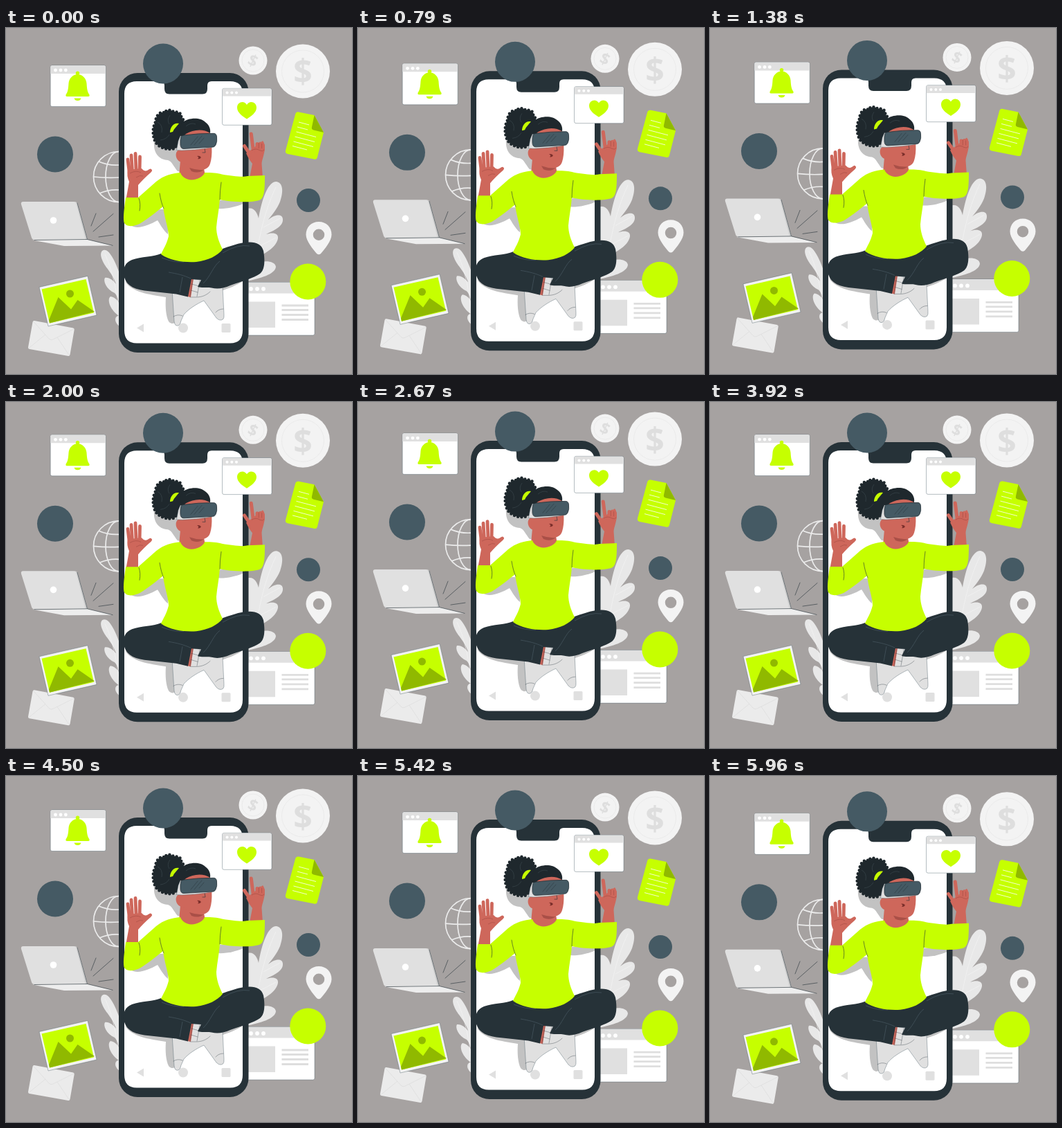
An HTML page that plays this animation: 500x500 px, repeating every 6 s.

```html
<!DOCTYPE html>
<html lang="en">
<head>
<meta charset="utf-8">
<title>Virtual reality on a phone</title>
<style>
html, body { margin: 0; width: 100%; height: 100%; overflow: hidden; background: #a6a2a1; }
svg { display: block; width: 100vw; height: 100vh; }
text { font: 700 48px "Open Sans", Lato, sans-serif; text-anchor: middle; fill: #dedede; }
.lime { fill: #c6ff00; }
.olive { fill: #90b900; }
.ink { fill: #263238; }
.slate { fill: #455a64; }
.skin { fill: #ce675b; }
.pale { fill: #f3f3f3; }
.gray { fill: #e0e0e0; }
.white { fill: #fff; }
.hand { fill: none; stroke: #ce675b; stroke-linecap: round; stroke-linejoin: round; }
.thin { fill: none; stroke: #263238; stroke-width: .6; stroke-linecap: round; stroke-linejoin: round; }
.edge { stroke: #455a64; stroke-width: .4; stroke-linejoin: round; }
</style>
</head>
<body>
<svg viewBox="0 0 500 500">
<defs>
  <clipPath id="screen"><rect x="171" y="77" width="171" height="378" rx="18"/></clipPath>
</defs>
<g id="scene">

  <!-- plants -->
  <g fill="#e8e8e8">
    <path d="M347 262C357 257 363 266 365 275C368 257 376 223 390 222C401 223 401 237 396 251C392 261 384 271 379 277C387 270 399 267 400 276C401 287 386 293 376 298C385 295 394 296 393 304C391 316 377 324 365 331L361 341C371 335 389 336 390 345C389 356 367 362 347 366Z"/>
    <path d="M139 322C146 317 155 328 166 360V432C156 427 156 416 163 416C149 406 146 391 151 388C157 389 161 393 163 397C162 390 160 386 157 383C145 378 140 365 143 361C149 360 155 365 159 370C156 360 151 354 146 347C140 339 134 327 139 322Z"/>
  </g>
  <path d="M390 230C376 260 366 292 357 362M396 275L372 288M390 303L365 316M143 327C153 348 160 377 165 420" fill="none" stroke="#f5f5f5" stroke-width=".6"/>

  <!-- globe -->
  <g fill="none" stroke="#ebebeb" stroke-width="1.700">
    <circle cx="163" cy="215" r="36.500"/>
    <ellipse cx="163" cy="215" rx="19" ry="36.500"/>
    <path d="M126.500 215Q145 217 163 216M134 193Q148 199 163 198M135 239Q149 233 163 234"/>
  </g>

  <!-- bell window -->
  <rect class="white edge" x="64.200" y="54" width="80" height="59.500" rx="2.500"/>
  <path class="gray" d="M64.300 66V56Q64.300 54.200 66.500 54.200H141.500Q143.900 54.200 143.900 56V66Z"/>
  <g class="white"><circle cx="71.500" cy="61" r="2.400"/><circle cx="79" cy="61" r="2.400"/><circle cx="86.300" cy="61" r="2.400"/></g>
  <g class="lime">
    <circle cx="103.500" cy="65.300" r="2.700"/>
    <path d="M103.500 67C110.500 67 116 73 116.500 80C117 88 117.500 92 120.500 96.500Q121 99 119 99H88Q86 99 86.500 96.500C89.500 92 90 88 90.500 80C91 73 96.500 67 103.500 67ZM98.500 101.500H108.500Q107.500 105 103.500 105T98.500 101.500Z"/>
  </g>

  <!-- coins -->
  <g class="pale">
    <circle cx="429" cy="62.500" r="39"/><circle cx="357" cy="47" r="20.500"/>
  </g>
  <g fill="none" stroke="#e4e4e4" stroke-width=".6"><circle cx="429" cy="62.500" r="30.500"/><circle cx="357" cy="47" r="16"/></g>
  <text x="429" y="80.500">$</text>
  <text transform="translate(357 47) rotate(25) scale(.48)" y="17.500">$</text>

  <!-- note -->
  <path class="lime" d="M423 121.500L445.500 126L459 151L450 186.500Q449 190.500 445 189.500L407 182Q403 181 404 177L418 125Q419 120.700 423 121.500Z"/>
  <path class="olive" d="M445.500 126L459 151L444.500 147.500Q441 146.500 442 143Z"/>
  <path d="M423 136L438 140M421 143L436 147M419.500 150L448 157.500M417.500 157L446 164.500M415.500 164L444 171.500M414 170.500L435 176" fill="none" stroke="#fff" stroke-width=".8"/>

  <!-- laptop -->
  <path fill="#ededed" d="M38 306.500L117 305.500L154 314.500L84 315Z"/>
  <path fill="#cfcfcf" d="M99 251Q103 251 104 255L118 305.500L112 306Z"/>
  <path class="gray" d="M25 251H98Q100.500 251 101.500 254L115 306H41Q38 306 37 303L22 255Q21 251 25 251Z"/>
  <path class="thin" d="M103 253L117.500 305.500L154 314.300M117 305.500L41 306.500"/>
  <circle class="white" cx="68.500" cy="278" r="4.800"/>
  <path class="thin" d="M123 286L130 268M126 294L155 268.500M134 302L155 299"/>

  <!-- envelope and picture -->
  <path fill="#ebebeb" d="M41 423L97 433.500Q99 434 98.700 436L92.500 472Q92 474.300 90 474L34 464Q31.800 463.500 32 461.500L38.500 425Q39 422.600 41 423Z"/>
  <path d="M39.500 424L62 449Q65 452 68 450L98 435M33 462.500L57 443M91 472.500L74 447" fill="none" stroke="#dedede" stroke-width=".8"/>
  <path class="pale edge" d="M48 374.500L118 358.500L131 415L61 431Z"/>
  <path class="lime" d="M51.500 377.500L115.500 363L127 411.500L63 426.500Z"/>
  <path class="olive" d="M63 426.500L62 422L75.500 389L94 406.500L103.500 393L128 410Z"/>
  <circle class="olive" cx="92.500" cy="384" r="5.500"/>

  <!-- page -->
  <rect class="white edge" x="340" y="367.500" width="106" height="76.500" rx="2.500"/>
  <path class="gray" d="M340 383.500V367.800H443.500Q445.700 367.800 445.700 370V383.500Z"/>
  <g class="white"><circle cx="354" cy="377" r="2.900"/><circle cx="363" cy="377" r="2.900"/><circle cx="372" cy="377" r="2.900"/></g>
  <path class="gray" d="M345 395.500H389V433H345Z"/>
  <path d="M398.500 401H437M398.500 407.500H437M398.500 414.500H437M398.500 421.500H437" stroke="#dedede" stroke-width="2.800"/>

  <!-- pin -->
  <path class="pale" fill-rule="evenodd" d="M452 280C463 280 470.500 288 470.500 298.500C470.500 308 460 320 455 326Q452 328.500 449 326C444 320 433.500 308 433.500 298.500C433.500 288 441 280 452 280ZM452 290.500A8.200 8.200 0 1 0 452 307A8.200 8.200 0 1 0 452 290.500Z"/>

  <!-- phone -->
  <rect class="ink" x="163" y="65" width="187.500" height="404" rx="27"/>
  <path class="white" d="M189 77H223Q229 77 229 83V88Q229 95.500 236 95.500H284Q291 95.500 291 88V83Q291 77 297 77H324Q342 77 342 95V437Q342 455.500 324 455.500H189Q171 455.500 171 437V95Q171 77 189 77Z"/>
  <g class="gray">
    <path d="M189 433.500L199 427.500V439.500Z"/><circle cx="256" cy="433.500" r="7"/><rect x="311.500" y="427" width="13" height="13" rx="1.500"/>
  </g>

  <!-- cast shadow -->
  <g fill="#c2c2c2" clip-path="url(#screen)">
    <path d="M214 165C213 180 220 190 234 191C240 193 242 200 248 207L256 208V170Z"/>
    <path d="M180 285C190 292 206 285 219 278C223 284 227 292 234 298V262H222Z"/>
    <path d="M309 249L305 261C320 262 334 258 345 253V247Z"/>
    <path d="M172 366C182 382 206 385 231 389C230 402 231 416 235 424C239 429 244 427 246 424L253 384Z"/>
    <path d="M290 392L309 380C325 376 336 370 345 364V352L310 366Z"/>
  </g>

  <!-- socks -->
  <path class="gray edge" d="M240 378L243 424Q244 431.500 249 430Q252 429 253 423L257 414C264 406 275 399 286 394L304 419Q309 424 313.500 421Q315.500 419 315 414L313 374L281 364L266 362L264 386Z"/>
  <path class="skin" d="M266 362L271 362.500L267 389L262 388Z"/>
  <path class="thin" stroke-opacity=".6" d="M270 363L266 388M280 365L276 388M268 370L279 373M267 379L277 382M266 389L275 389C283 389 290 386 295 381M303 411Q307 406 314 406M242 417Q248 413 255 416"/>

  <!-- trousers -->
  <path class="ink" d="M224 326C214 331 195 330 182 335C172 339 169 347 170 356C172 370 182 377 200 379.500L246 384.500L263 388.500L268 363L282 364L277 374C284 376 290 374 297 375.500C306 378 315 376 324 372C341 366 357 362 367 355C375 349 374 333 372 322C369 311 359 308 344 310C332 312 322 316 313 319C287 331 248 332 224 326Z"/>
  <path d="M267 362C256 357 247 355 235 353M251 382L255 360M285 369C295 360 300 343 309 337M225 332Q242 339 257 338M313 325Q335 312 352 315" fill="none" stroke="#4d5f68" stroke-width=".6"/>

  <!-- hands -->
  <path class="skin" d="M176 205L196 203C200 208 204 207 208 204Q213 204 209 209C202 215 196 221 191 227L191 250H173L178 222Q174 214 176 205Z"/>
  <path class="hand" stroke-width="4.800" d="M178.500 211L176 190M182.500 207L181 184M188 206L187 181.500M193 208L193.500 186M192 217L208.500 206"/>
  <path class="skin" d="M354 176L371 163Q375 167 373.500 178C372 187 370 190 369.500 196L371 217H352L356 196C353 192 350 188 347 181Z"/>
  <path class="hand" stroke-width="5" d="M357.500 178L354.300 153M363 176V167.500M367.500 176V167M371.300 176V169.500M353 183L344.500 170.500"/>
  <path fill="none" stroke="#a94f47" stroke-width=".7" d="M179 210Q188 205 195 209M188 216Q194 212 198 214M355 177Q361 173 367 177Q371 179 373 176M365.300 166V174M369.600 167V174"/>

  <!-- neck and sweater -->
  <path class="skin" d="M253 180L288 185L285 197L288 214L268 222L250 214Z"/>
  <path class="lime" d="M252 209C240 210 228 213 217 222L191 245L173 245C171 260 169 272 170.500 281C174 288 184 287 193 283C206 275 218 265 227 258C229 275 235 290 235 301C232 313 227 320 224 327C238 337 259 339 275 338C292 336 306 329 313 320C307 308 304 298 304 288C305 275 308 262 309 248C325 251.500 354 253 367 248.500C373 245 374 236 374 213L349 214C343 216 327 214 312 211.500C305 209.500 298 209 287 209C285 215 277 219 268 219.500C260 219 254 215 252 209Z"/>
  <path class="thin" d="M222 239Q224 252 228 261M311 223Q309 236 309 248M192 246Q195 254 193 264"/>

  <!-- head -->
  <path class="skin" d="M250 160L258 145L293 145C298 165 299 184 295 196C292 206 280 207 268 203L254 194C244 192 243 177 251 176Z"/>
  <path fill="#a94f47" d="M265 202Q276 206 286 205Q278 211 268 207Z"/>
  <path class="thin" d="M287 174L288 180L284 180"/>
  <path fill="#7b2f2b" d="M276 185Q280 184 282 187Q280 190 277 189Q280 187 276 185Z"/>
  <g fill="#1f282d" stroke="#1f282d" stroke-linecap="round">
    <path d="M228 122C220 121 216 130 216 136C211 145 212 157 216 165C222 174 235 177 244 174L257 148C260 139 257 132 253 129C255 123 248 121 242 121C237 117 232 119 228 122Z" stroke-width="4.500" stroke-dasharray="0 5.300"/>
    <path d="M245 168L254 137C264 129 281 129 288 136C294 140 296 147 295 152C285 145 270 147 260 153C254 158 251 165 249 176Z" stroke="none"/>
  </g>
  <path class="lime" d="M237 151C237 143 243 136 250 138C247 142 243 145 241 150Z"/>
  <path d="M219 136Q227 140 225 151M223 162Q232 161 236 154M237 126Q232 133 236 139M260 142Q267 136 274 139" fill="none" stroke="#435057" stroke-width=".5"/>

  <!-- headset -->
  <path class="gray edge" d="M252 156L249 163L246.500 176.500L254 177Q280 176 301 172L304 166Z"/>
  <path class="slate" stroke="#263238" stroke-width=".8" d="M257 155Q278 152 300 152.300Q304 152.300 304.500 157Q305.500 164 303 169Q302 171.500 298 172L257 174.500Q252.500 174.500 252 169Q251.500 161 253 157Q254 155.300 257 155Z"/>
  <path class="thin" stroke-opacity=".8" d="M267 169L277 157M272 169L283 156M279 167L286 159"/>

  <!-- heart window -->
  <rect class="white edge" x="312.500" y="87.300" width="71.500" height="53" rx="2.500"/>
  <path class="gray" d="M312.800 98.500V90Q312.800 87.600 315 87.600H381.500Q383.700 87.600 383.700 90V98.500Z"/>
  <g class="white"><circle cx="319.500" cy="93.500" r="2"/><circle cx="326.300" cy="93.500" r="2"/><circle cx="333" cy="93.500" r="2"/></g>
  <path class="lime" d="M348 131.500C341 127 334 122 334 115C334 107 344 104 348 111C352 104 362 107 362 115C362 122 355 127 348 131.500Z"/>

  <!-- badges -->
  <g class="slate">
    <circle cx="227" cy="51.500" r="29"/><circle cx="71" cy="182.500" r="26"/><circle cx="437" cy="249" r="17"/>
  </g>
  <circle class="lime" cx="436.300" cy="366.500" r="26"/>
</g>
</svg>
<script>
const scene = document.getElementById("scene");
const LOOP = 6000, RISE = 10;

// Steady rise for half the loop, steady fall for the other half.
function draw() {
  const p = performance.now() % LOOP / LOOP;
  const y = -RISE * (1 - Math.abs(2 * p - 1));
  scene.setAttribute("transform", `translate(0 ${y.toFixed(3)})`);
  requestAnimationFrame(draw);
}
draw();
</script>
</body>
</html>
```
